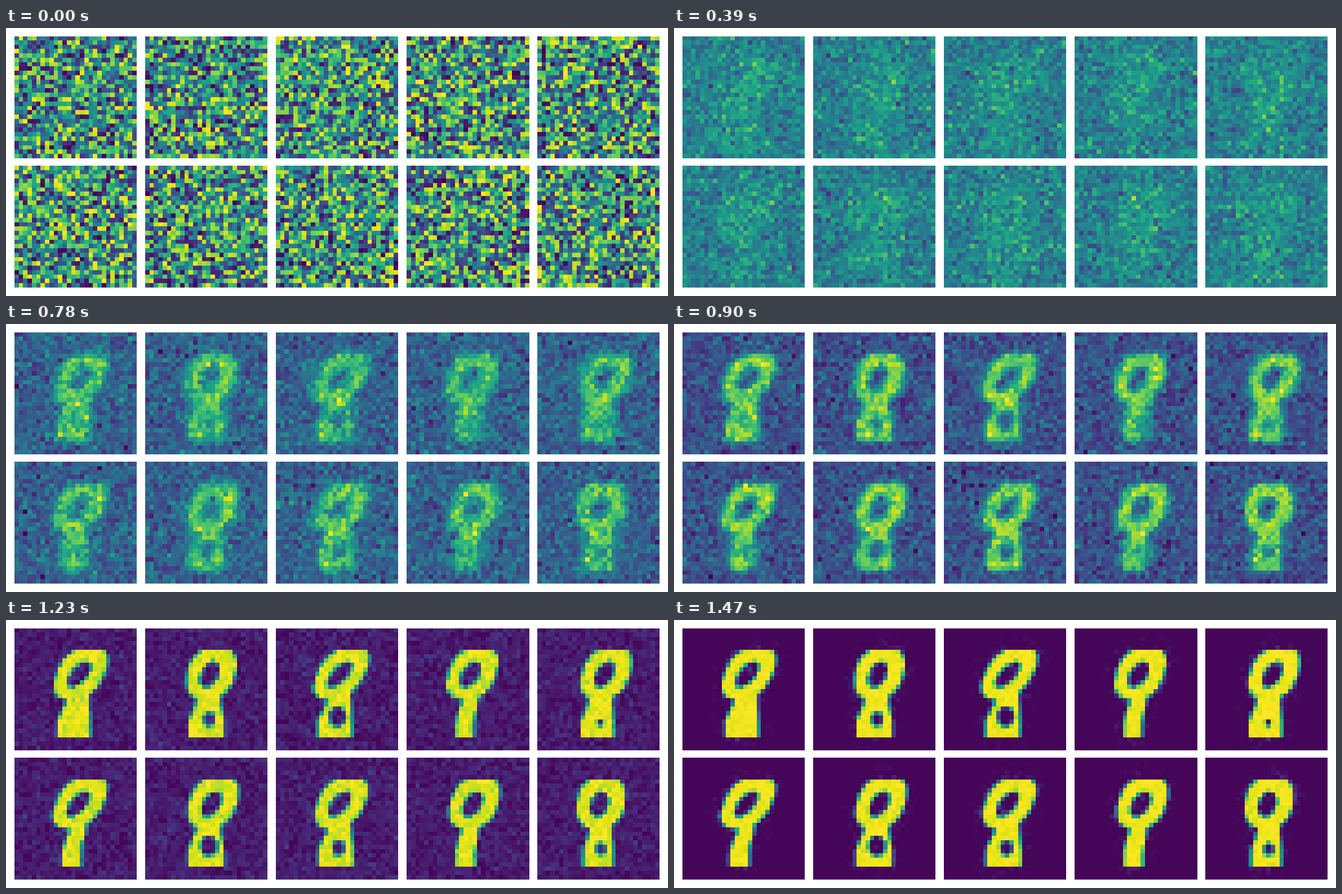
Recreate the animation shown at these times as a matplotlib script. Size 1175x477 px, loop 1500 ms.

```python
import numpy as np
import matplotlib.pyplot as plt
from matplotlib.animation import FuncAnimation

W, H, DPI = 1175, 477, 64
N, FRAMES, INTERVAL = 28, 50, 30
SIZE = 217
SUB = 6

# Sub-cell sample positions for antialiased shapes
axis = (np.arange(N * SUB) + 0.5) / SUB
X, Y = np.meshgrid(axis, axis)


def smooth(t):
    t = np.clip(t, 0, 1)
    return t * t * (3 - 2 * t)


def coverage(shape):
    return shape.reshape(N, SUB, N, SUB).mean(axis=(1, 3))


def oval(cx, cy, rx, ry, shear=0, power=2):
    """Slanted superellipse; positive shear leans its top to the right."""
    u = np.abs(X - cx - shear * (cy - Y)) / rx
    v = np.abs(Y - cy) / ry
    return u ** power + v ** power <= 1


def digit(cx, shear, foot, gap):
    """Slanted top loop on a flared stem; gap is the size of a lower hole."""
    top = oval(cx, 10.3, 5.5, 6, shear, 2.5)
    top &= ~oval(cx - 0.4, 10.7, 2.1, 2.9, 1.5 * shear)
    # The stem runs from a narrow waist down to the foot
    waist = 0.9 + 0.45 * foot
    foot_x = 14.5 - 2 * shear - 0.3 * (4.2 - foot)
    down = smooth((Y - 16) / 6)
    middle = 14.5 + (foot_x - 14.5) * down
    stem = np.abs(X - middle) <= waist + (foot - waist) * down
    stem &= Y >= 14.5
    if gap:
        stem &= ~oval(foot_x + 0.6, 22.4 - gap, 0.95 * gap, 1.1 * gap)
    return coverage((top | stem) & (Y >= 5) & (Y <= 25))


# centre, slant, foot half-width, lower hole
final = np.array([digit(*style) for style in (
    (15.2, 0.38, 3.8, 0), (15.2, 0.20, 4.1, 1.5), (15.0, 0.45, 4.0, 2.1),
    (15.0, 0.28, 2.1, 0), (15.8, 0.27, 3.8, 0.7), (15.0, 0.40, 2.2, 0),
    (15.6, 0.25, 4.2, 2.1), (15.0, 0.35, 4.1, 1.6), (15.5, 0.25, 2.3, 0),
    (14.6, 0.13, 3.5, 1.3))])

# While still undecided, every digit carries a faint lower loop
inner = coverage(oval(14.1, 20.8, 1.6, 2.1))
loop = coverage(oval(14.1, 20.8, 3.9, 4.3) & (Y <= 25)) - inner
early = np.maximum(final, 0.55 * loop) * (1 - 0.5 * inner)


def blur(masks, sigma):
    if sigma < 0.1:
        return masks
    i = np.arange(N)
    k = np.exp(-0.5 * ((i[:, None] - i) / sigma) ** 2)
    k /= k.sum(axis=1, keepdims=True)
    return k @ masks @ k.T


halo = blur(final, 1.8)

# Slowly drifting noise: uniform at the start, soon bell-shaped
rng = np.random.default_rng(8)
KEEP = 0.9
noise = [rng.uniform(-1.732, 1.732, final.shape)]
for _ in range(FRAMES - 1):
    fresh = rng.standard_normal(final.shape)
    noise.append(KEEP * noise[-1] + np.sqrt(1 - KEEP ** 2) * fresh)


def panels(frame):
    t = frame / (FRAMES - 1)
    settle = smooth(t ** 1.5)
    burst = np.exp(-frame / 2)
    back = 0.455 - 0.44 * settle + 0.045 * burst
    fore = 0.46 + 0.52 * smooth(t ** 0.85) + 0.04 * burst
    spread = 0.02 + 0.08 * (1 - settle ** 2) + 0.189 * burst

    undecided = 1 - smooth((t - 0.5) / 0.35)
    late = smooth((t - 0.84) / 0.16)
    mask = blur(final + undecided * (early - final), 3.2 * (1 - t) ** 1.6)
    n = noise[frame]
    level = back + (fore - back) * mask
    level = level + spread * n * (1 - late * (1 - mask))
    level = level + late * 0.16 * halo * (1 - mask) * np.maximum(n - 0.4, 0)
    return np.clip(level, 0.015 * t, 1)


fig = plt.figure(figsize=(W / DPI, H / DPI), dpi=DPI, facecolor="white")
images = []
for i, data in enumerate(panels(0)):
    left = 15 + 232 * (i % 5)
    top = 15 + 230 * (i // 5)
    ax = fig.add_axes([left / W, 1 - (top + SIZE) / H, SIZE / W, SIZE / H])
    ax.axis("off")
    images.append(ax.imshow(data, cmap="viridis", vmin=0, vmax=1,
                            interpolation="nearest", aspect="auto"))


def draw(frame):
    for image, data in zip(images, panels(frame)):
        image.set_data(data)
    return images


anim = FuncAnimation(fig, draw, frames=FRAMES, interval=INTERVAL,
                     repeat=True, repeat_delay=0, blit=False)
plt.show()
```
